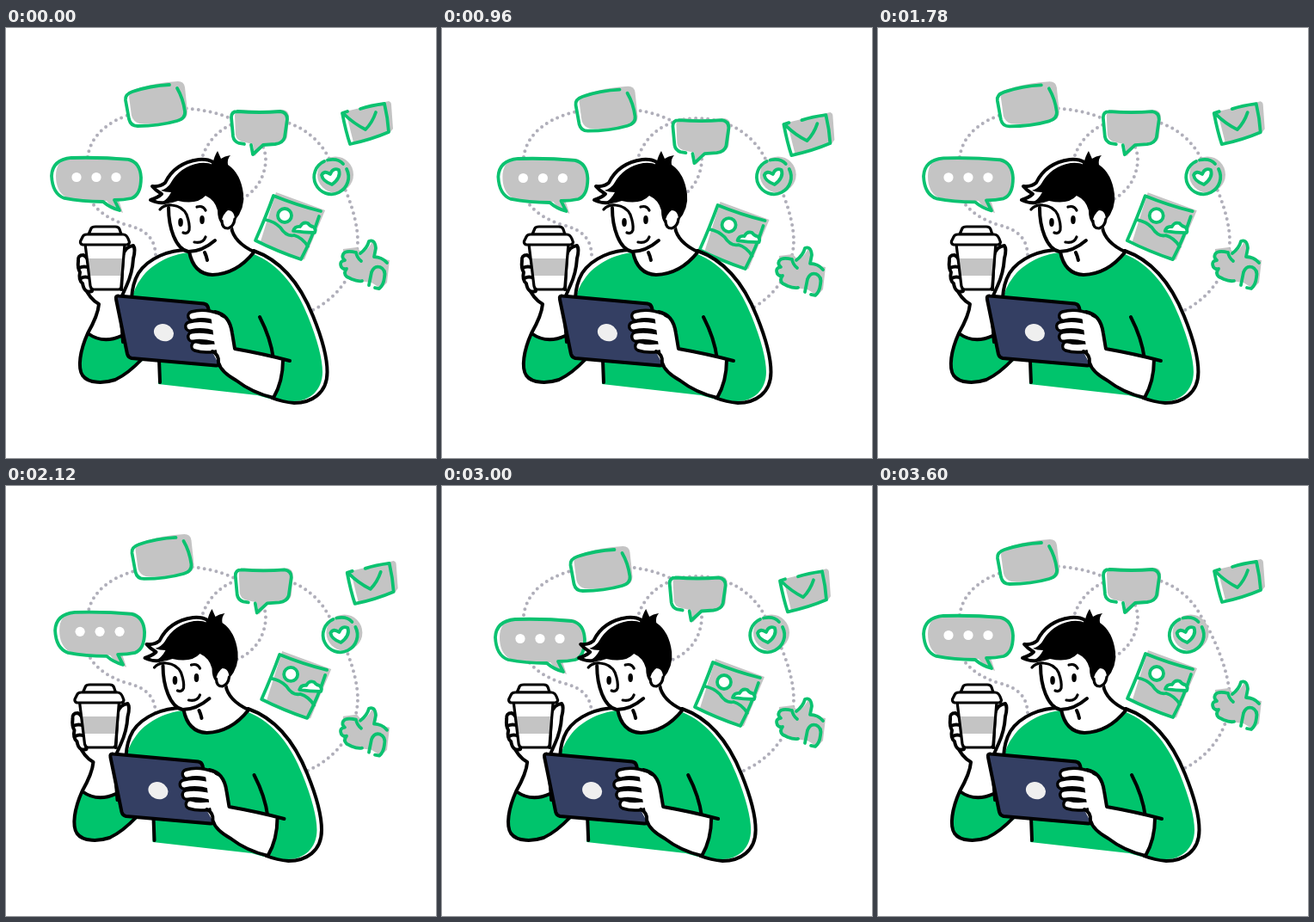
Write an HTML page that moves like this. It is 500 by 500 pixels and loops after 3.62 s.

```html
<!DOCTYPE html>
<html lang="en">
<head>
<meta charset="utf-8">
<title>Chatting over coffee</title>
<style>
html, body { margin: 0; width: 100%; height: 100%; overflow: hidden; background: #fff; }
svg { display: block; width: 100vw; height: 100vh; }
.line { fill: none; stroke: #000; stroke-width: 4; stroke-linecap: round; stroke-linejoin: round; }
.thin { stroke-width: 3.2; }
.white { fill: #fff; }
.green { fill: #00c46c; }
.ink { fill: #000; }
.gray { fill: #c4c4c4; }
.mark { fill: none; stroke: #0bc270; stroke-width: 3.8; stroke-linecap: round; stroke-linejoin: round; }
.mark.white { fill: #fff; }
.dots { fill: none; stroke: #b0afba; stroke-width: 4; stroke-linecap: round; stroke-dasharray: 0 7; }
.finger { fill: none; stroke-linecap: round; stroke-linejoin: round; }
</style>
</head>
<body>
<svg viewBox="0 0 500 500" xmlns="http://www.w3.org/2000/svg">
  <g class="dots">
    <path d="M95 150C100 112 145 93 195 93C250 93 303 115 302 155C300 180 285 195 266 203"/>
    <path d="M229 148C237 126 258 106 295 105C335 105 362 125 376 152C392 177 409 218 409 248C408 287 382 319 346 333"/>
    <path d="M98 200C106 213 121 223 140 229C160 234 173 242 174 264"/>
  </g>

  <g id="card">
    <path class="white" d="M146 73Q168 66 192 66Q203 66 204 74L209 97Q209 106 199 108Q176 114 153 114Q145 113 143 106L139 84Q138 76 146 73Z"/>
    <path class="gray" d="M150 71Q176 63 200 62Q207 62 208 69L211 97Q211 106 203 108Q178 113 155 111Q148 109 146 102L143 80Q143 74 150 71Z"/>
    <path class="mark" d="M190 66Q168 67 147 74Q138 77 139 84L143 106Q145 114 153 114Q178 114 199 108Q209 105 208 97Q206 82 199 70"/>
  </g>

  <g id="talk">
    <path class="white" d="M76 151Q110 150 142 153Q156 156 157 174Q157 194 146 198Q137 200 126 200L132 212Q121 209 113 202Q88 202 68 198Q54 193 53 172Q54 153 76 151Z"/>
    <path class="gray" d="M74 150Q110 148 144 151Q158 156 158 175Q157 193 149 197L131 200L136 215Q122 209 117 201Q88 201 70 197Q58 190 58 172Q58 154 74 150Z"/>
    <path class="mark" d="M76 151Q110 150 142 153Q156 156 157 174Q157 194 146 198Q137 200 126 200L132 212Q121 209 113 202Q88 202 68 198Q54 193 53 172Q54 153 76 151Z"/>
    <g class="white"><circle cx="82" cy="173.500" r="5.600"/><circle cx="105" cy="173.500" r="5.600"/><circle cx="128" cy="173.500" r="5.600"/></g>
  </g>

  <g id="chat">
    <path class="white" d="M269 97Q295 100 319 98Q327 98 327 106L324 127Q322 134 313 135L299 136L288 148L286 136L271 134Q265 132 264 126L262 104Q262 97 269 97Z"/>
    <path class="gray" d="M272 95Q300 97 322 95Q329 96 329 104L327 126Q326 133 317 134L301 136L289 149L287 135L274 132Q268 130 267 124L266 102Q266 96 272 95Z"/>
    <path class="mark" d="M269 97Q295 99 319 97Q327 98 327 106L324 127Q322 134 313 135L299 136L287 147L285 136M277 135L271 134Q265 132 264 126L262 104Q262 97 269 97"/>
  </g>

  <g id="mail">
    <path class="white" d="M391 99L440 88L446 121L400 135Z"/>
    <path class="gray" d="M395 97L445 85Q448 86 448 89L450 117L447 121L404 133Z"/>
    <path class="mark" d="M397 97L391 99Q395 120 400 135Q424 130 445 121Q444 105 440 88Q424 90 412 94M393 100Q404 111 418 118Q426 110 430 98"/>
  </g>

  <g id="heart">
    <circle class="white" cx="378" cy="173" r="20"/>
    <circle class="gray" cx="383" cy="170.500" r="21"/>
    <path class="mark" d="M370 155A20 20 0 1 0 396 164M374 153.500Q386 151 392 158"/>
    <path class="mark white" d="M379 182Q368 178 367 171Q370 165 377 170Q380 162 387 165Q390 174 379 182Z"/>
  </g>

  <g id="photo">
    <path class="white" d="M311 195L366 215L343 269L290 248Z"/>
    <path class="gray" d="M314 191L371 212L347 269L343 270L296 248Z"/>
    <path class="mark" d="M366 213Q338 206 311 195Q302 220 290 247Q316 260 343 269Q356 244 364 219M302 223Q312 225 319 232Q326 243 335 241Q345 244 351 254"/>
    <circle class="mark white" cx="324" cy="218" r="8"/>
    <path class="mark white" d="M334 236Q336 230 342 231Q345 225 351 227Q354 231 357 231Q361 234 359 238Q346 238 334 236Z"/>
  </g>

  <g id="thumb">
    <path class="white" d="M389 262L410 262Q420 256 423 247Q430 246 430 257L429 267L443 274L438 303L399 293L389 280Z"/>
    <path class="gray" d="M392 257L408 255L414 262Q422 257 426 248L430 250L429 267L446 270L443 296L436 303L425 296L400 293L391 280Z"/>
    <path class="mark" d="M407 261Q395 258 392 263Q390 267 394 270Q387 271 390 278Q392 281 396 280Q392 285 396 289L402 292Q409 295 414 294M407 261Q408 267 413 271M412 262Q420 256 422 248Q429 245 430 256L428 266Q437 266 443 273M422 299L425 284Q428 276 435 278Q442 281 440 290Q439 299 434 303L429 302"/>
  </g>

  <g id="man">
    <!-- torso -->
    <path class="white" d="M214 258C190 257 165 268 154 285Q147 297 146 314L179 380L179 414L292 427C310 433 322 436 335 436C355 436 374 425 374 400C374 385 368 362 357 335C345 305 325 272 288 259Z"/>
    <path class="green" d="M213 261C190 263 168 276 158 290Q148 303 146 318L177 380L177 414L292 427C312 433 322 434 335 434C353 434 368 421 368 400C368 385 362 362 351 335C339 305 320 275 286 262Z"/>
    <path class="line" d="M214 258C190 257 165 268 154 285Q147 297 146 314M288 259C325 272 345 305 357 335C368 362 373.500 385 373.500 400C373.500 425 355 436 335 436Q322 435 309 430M178 386L179 412M295 336Q308 361 311 385"/>
    <!-- neck -->
    <path class="white" d="M214 259Q217 287 241 287Q270 285 287 261Q267 250 262 230L225 240Z"/>
    <path class="line" d="M213 260Q218 286 240 287Q268 286 288 261M262 232Q265 249 288 260M231 261Q233 265 234 270"/>
    <!-- head -->
    <path class="white" d="M189 204C188 232 196 258 213 261Q227 260 243 249L263 232L269 209L240 184L200 190Z"/>
    <path class="line" d="M189 209C189 232 197 257 212 260Q228 260 243 247"/>
    <path class="line white" d="M184 203Q177 204 168 200Q177 197 181 193Q174 189 170 184Q179 185 185 180Q196 157 224 153Q234 152 241 156L240 185Z"/>
    <path class="ink" d="M180 204Q188 199 192 191Q185 191 180 189Q188 186 191 181Q202 161 225 157Q235 156 240 159Q242 149 246 143L250 152Q254 149 261 148Q257 152 258 159Q273 169 276 193Q278 210 266 224Q266 212 258 212Q252 216 250 227Q246 222 246 212Q243 200 232 195Q222 206 200 201Q190 205 180 204Z"/>
    <path class="line thin" d="M251 224Q251 233 258 233Q265 231 266 222"/>
    <path class="line thin" d="M179 211Q184 205 193 206Q205 207 210 217Q214 228 213 235Q211 240 206 238M222 208Q229 206 232 212M219 249Q229 251 232 243"/>
    <ellipse class="ink" cx="203" cy="226" rx="2.800" ry="5"/>
    <ellipse class="ink" cx="228" cy="223" rx="2.800" ry="5"/>
    <!-- arm with cup -->
    <path class="white" d="M93 290L108 322Q103 340 95 355Q113 369 139 358L134 314L141 300Z"/>
    <path class="green" d="M95 356C86 375 83 395 89 404C96 414 115 413 127 409Q142 402 160 386L140 380L136 358Q114 369 95 356Z"/>
    <path class="line" d="M91 300Q97 315 108 321Q107 334 95 355C86 375 83 395 89 404C96 414 115 413 127 409Q142 402 158 385M95 355Q113 368 134 358M132 314L136 365"/>
    <g class="line">
      <path class="white" d="M84 271Q83 264 90 264Q96 267 97 277L100 306Q91 309 89 297Q84 293 86 284Q83 279 84 271Z"/>
      <path d="M85 279Q91 276 97 279M87 291Q92 288 98 291"/>
      <path class="white" d="M134 304L136 264Q139 254 148 253Q151 257 148 268Q147 285 140 300L132 318"/>
    </g>
    <path class="white" d="M92 251L99 303H134L138 251Z"/>
    <path class="gray" d="M95 268H137L135.500 288H97.500Z"/>
    <g class="line thin">
      <path d="M92 251L98 300Q99 304 102 304H131Q134 304 134 300L138 251"/>
      <path class="white" d="M96 240L99 233Q100 231 104 231H127Q131 231 132 234L134 240Z"/>
      <path class="white" d="M94 240H136Q140 240 142 245L143.500 249Q143 252 140 252H89Q86 251 86.500 248L89 243Q90 240 94 240Z"/>
    </g>
    <!-- tablet -->
    <path class="line" style="fill:#343f63" d="M131 311.500L230 320.500Q234 321 235 325L248 388Q248 393 244 392.500L146 384Q142 383 141 379L128 315.500Q127 311 131 311.500Z"/>
    <ellipse cx="183.500" cy="354" rx="11.800" ry="9.800" fill="#efefef" transform="rotate(22 183 354)"/>
    <!-- arm on tablet -->
    <path class="white" d="M238 332Q260 334 263 356L266 374L322 386Q322 410 311 430Q286 424 268 410Q249 399 246 388L236 370Z"/>
    <g id="fingers"></g>
    <path class="white" d="M238 333Q260 334 263 356L266 374L252 388L246 388Q247 378 243 371Z"/>
    <path class="line" d="M243 330Q260 333 263 355L266 373Q300 379 330 387M322 386Q322 411 311 430Q286 424 268 410Q250 400 247 389Q248 380 240 376"/>
  </g>
</svg>
<script>
const LOOP = 3620, TURN = 3600, ORBIT = 1800, STEP = 600;
const $ = id => document.getElementById(id);

// Offsets one third and two thirds of the way round each closed path.
const orbits = {
  card: [[15.5, -1], [10.5, 8]],
  talk: [[10, -4], [9, 4]],
  chat: [[8, 5], [2.7, 9.5]],
  mail: [[9, 8], [2, 11.3]],
  photo: [[12, 6], [4, 10]]
};
const shake = [0, 20, 0, 0, 20, 0, -20, -20];

const move = (id, x, y) => $(id).setAttribute("transform", `translate(${x.toFixed(2)} ${y.toFixed(2)})`);
const through = (p, q, a) => (p + q) / 3 * (1 - Math.cos(a)) + (p - q) / Math.sqrt(3) * Math.sin(a);

function drawFingers() {
  const tips = ["M221 370Q230 373 242 371", "M217 359Q228 357 244 361", "M214 347Q228 343 246 349", "M217 335Q230 331 246 337"];
  const stroke = (d, color, width) => `<path class="finger" d="${d}" stroke="${color}" stroke-width="${width}"/>`;
  $("fingers").innerHTML = tips.map(d => stroke(d, "#000", 14) + stroke(d, "#fff", 7)).join("");
}

function render(t) {
  const a = t / ORBIT * 2 * Math.PI % (2 * Math.PI);
  const lift = a < 2 * Math.PI / 3 ? 2.7 * Math.sin(a * 1.5) ** 2 : 0;
  for (const [id, [p, q]] of Object.entries(orbits))
    move(id, through(p[0], q[0], a), through(p[1], q[1], a) - (id === "card" ? lift : 0));

  const sway = t / TURN * 2 * Math.PI;
  move("man", 9.8 * Math.sin(sway) - 0.7 * (1 - Math.cos(sway)), 0);

  const i = Math.floor(t / STEP), f = t / STEP - i;
  const s = shake[i] + (shake[i + 1] - shake[i]) * f;
  move("heart", s * 0.97, 0);
  move("thumb", 0, s);
}

drawFingers();
const start = performance.now();
(function tick() {
  render((performance.now() - start) % LOOP);
  requestAnimationFrame(tick);
})();
</script>
</body>
</html>
```
